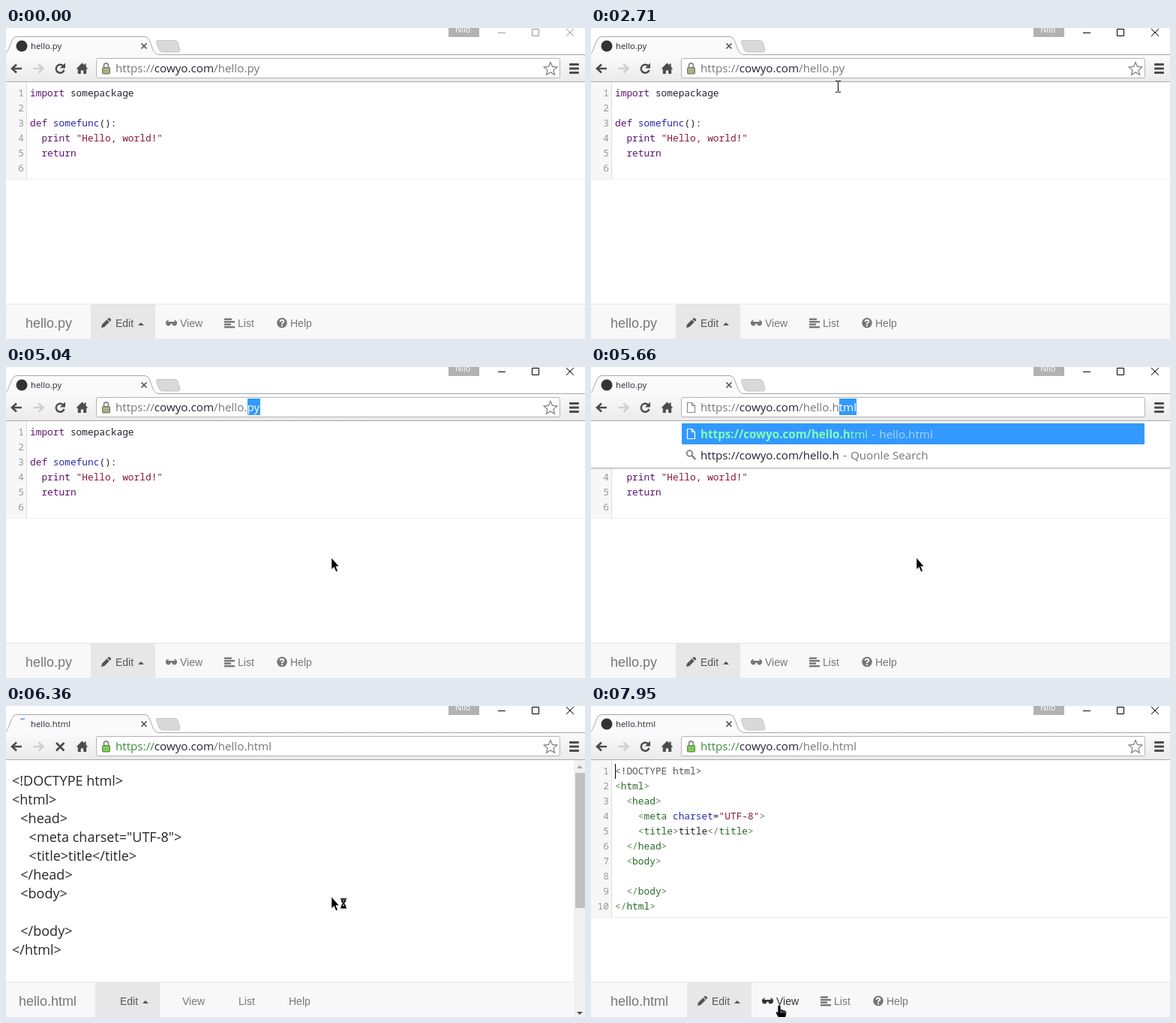
An HTML page for the animation above (8 s loop, 772 by 414 pixels).

```html
<!DOCTYPE html>
<html lang="en">
<head>
<meta charset="utf-8">
<title>Editor in a browser</title>
<style>
  html, body { margin: 0; width: 100%; height: 100%; overflow: hidden; background: #fff; }
  svg { display: block; width: 100%; height: 100%; }
  text { white-space: pre; }
  .ui { font-family: "Open Sans", "Noto Sans", sans-serif; }
  .code { font: 12.83px "Noto Sans Mono", monospace; }
  .nav { font-family: "Liberation Sans", Arial, sans-serif; }
</style>
</head>
<body>
<svg id="stage" viewBox="0 0 772 414" xmlns="http://www.w3.org/2000/svg">
  <defs>
    <linearGradient id="bar" x2="0" y2="1">
      <stop stop-color="#fafafa"/><stop offset="1" stop-color="#ebebeb"/>
    </linearGradient>
  </defs>
  <g id="page"></g>
  <g id="chrome"></g>
  <g id="pointer"></g>
</svg>
<script>
const LOOP = 8000;
const T = { focus: 1940, urlClick: 3250, dragY: 3730, dragP: 4570, type: 5660,
            busy: 5980, go: 6210, raw: 6360, editor: 6440, ready: 6530 };

// Pointer moves: first step, last step, number of steps, path of hot spots
const MOVES = [
  [220, 1000, 11, [[639, 338], [420, 240], [230, 165], [152, 142], [160, 160], [173, 178]]],
  [1080, 1080, 1, [[173, 180]]],
  [1400, 1400, 1, [[170, 178]]],
  [1630, 1630, 1, [[168, 178]]],
  [2180, 2870, 10, [[175, 162], [373, 54]]],
  [3030, 3250, 4, [[380, 55], [398, 60]]],
  [3410, 3410, 1, [[398, 62]]],
  [3560, 3730, 3, [[375, 62], [333, 62]]],
  [4030, 4030, 1, [[331, 62]]],
  [4570, 4570, 1, [[326, 62]]],
  [4890, 5040, 3, [[345, 96], [434, 254]]],
  [6760, 7470, 10, [[428, 251], [340, 228], [258, 234]]],
  [7570, 7950, 6, [[256, 258], [251, 399]]]
];

const within = (t, a, b) => t >= a && t < b;
const esc = s => s.replace(/&/g, '&amp;').replace(/</g, '&lt;');
const rect = (x, y, w, h, fill, more = '') =>
  `<rect x="${x}" y="${y}" width="${w}" height="${h}" fill="${fill}" ${more}/>`;
const fillPath = (d, fill, more = '') => `<path d="${d}" fill="${fill}" ${more}/>`;
const line = (d, color, w = 1, more = '') =>
  `<path d="${d}" fill="none" stroke="${color}" stroke-width="${w}" ${more}/>`;
const label = (cls, x, y, size, color, s) =>
  `<text class="${cls}" x="${x}" y="${y}" font-size="${size}" fill="${color}">${s}</text>`;
const span = (s, color, more = '') => `<tspan fill="${color}" ${more}>${esc(s)}</tspan>`;
const at = (x, y, s) => `<g transform="translate(${x} ${y})">${s}</g>`;

// ---- Editor ----
const INK = { k: '#5c1470', v: '#26202c', d: '#2a2ab0', s: '#8a1838',
              m: '#555', b: '#5f8050', t: '#276b27', a: '#2a2ab0' };
const tag = name => ['b:<', 't:' + name, 'b:>'];
const end = name => ['b:</', 't:' + name, 'b:>'];
const PY = [
  ['k:import', 'v: somepackage'],
  [],
  ['k:def', 'd: somefunc', 'v:():'],
  ['k:  print ', 's:"Hello, world!"'],
  ['k:  return'],
  []
];
const HTML = [
  ['m:<!DOCTYPE html>'],
  tag('html'),
  ['v:  ', ...tag('head')],
  ['b:    <', 't:meta', 'a: charset', 'v:=', 's:"UTF-8"', 'b:>'],
  ['v:    ', ...tag('title'), 'v:title', ...end('title')],
  ['v:  ', ...end('head')],
  ['v:  ', ...tag('body')],
  [],
  ['v:  ', ...end('body')],
  end('html')
];

function editor(lines) {
  const h = lines.length * 20 + 9;
  const rows = lines.map((parts, i) => {
    const y = 91 + i * 20;
    const code = parts.map(p => span(p.slice(2), INK[p[0]])).join('');
    return `<text class="code" x="24" y="${y}" fill="#999" text-anchor="end">${i + 1}</text>` +
           `<text class="code" x="32" y="${y}">${code}</text>`;
  });
  return rect(0, 72, 27, h, '#f7f7f7') + rect(27, 72, 1, h, '#ddd') +
         rect(0, 72 + h, 772, 1, '#eee') + rows.join('');
}

function rawPage() {
  const rows = HTML.map((parts, i) => {
    const s = parts.map(p => p.slice(2)).join('');
    const indent = s.length - s.trimStart().length;
    return label('ui', 8 + indent * 5.65, 106 + i * 25, 18, '#262626', esc(s.trim()));
  });
  return rows.join('') + rect(757, 72, 15, 342, '#f1f1f1') + rect(759, 89, 13, 180, '#c1c1c1') +
         fillPath('M761 83h8l-4-4z', '#a3a3a3') + fillPath('M761 407h8l-4 4z', '#505050');
}

// ---- Bottom bar ----
const ICONS = [
  c => fillPath('M0 13l1-4.2 6.5-6.5 3.2 3.2L4.2 12zM8.3 1.5l1.2-1.2q1-.8 2 0l1.4 1.4q.7 1-.1 1.8l-1.3 1.2z', c),
  c => fillPath('M0 5L3 2.5 4 3.2 2.5 5h10L11 3.2l1-.7L15 5v2.5q-.8 3-3.5 3T8.3 7.5H6.7q-.5 3-3.2 3T0 7.5z', c),
  c => [[1, 10], [4.5, 14], [8, 9], [11.5, 14]].map(([y, w]) => rect(0, y - .5, w, 2.4, c)).join(''),
  c => `<circle cx="7" cy="6.5" r="6.8" fill="${c}"/>` +
       line('M4.7 5q0-2.2 2.3-2.2T9.3 4.7Q9.3 6 7 7v1.2', '#f8f8f8', 1.9) +
       rect(6, 9.2, 2, 2, '#f8f8f8')
];

function navBar(mode, hover) {
  const raw = mode === 'raw', shift = mode === 'html' ? 15 : 0;
  const boxX = raw ? 119 : 113 + shift;
  const xs = raw ? [152, 235, 310, 377] : [146, 232, 309, 379].map(x => x + shift);
  const items = ['Edit', 'View', 'List', 'Help'].map((name, i) => {
    const color = i === 0 ? '#555' : i === 1 && hover ? '#333' : '#777';
    const icon = raw ? '' : at(xs[i] - (i < 2 ? 19 : 18), 386, ICONS[i](color));
    return icon + label('nav', xs[i], 398, 14, color, name);
  });
  const width = raw ? 757 : 772;
  return rect(0, 367, width, 47, '#f8f8f8') + rect(0, 367, width, 1, '#e7e7e7') +
         rect(boxX, 368, 86, 46, '#e7e7e7') +
         label('nav', raw ? 17 : 26, 399, 18, '#777', mode === 'py' ? 'hello.py' : 'hello.html') +
         items.join('') + fillPath(`M${xs[0] + 30} 396h8l-4-4z`, '#555');
}

// ---- Browser frame ----
const GREY = '#79747c', DARK = '#262230', BLUE = '#39f', TOOL = '#4c4c4c';

const sheet = (x, y, color) =>
  at(x, y, line('M.5 .5h6l4 4v9h-10zM6.5 .5v4h4', color, 1.2));

const lock = (body, edge) =>
  line('M130.5 53v-3q0-3 3-3t3 3v3', '#8a8a8a', 1.8) +
  rect(128.5, 52.5, 10, 8.5, body, `stroke="${edge}" rx="1"`) +
  line('M130 55.5h7M130 58.5h7', '#fff', .8, 'opacity=".45"');

function tools(loading) {
  const arrow = 'M7.5 0L1.5 5.5 7.5 11M2 5.5H14.5';
  const reload = loading
    ? line('M67 49l10.5 10.5M77.5 49L67 59.5', TOOL, 2.8)
    : line('M76 50.2A5.5 5.5 0 1 0 77.5 56', TOOL, 2.4) + fillPath('M79 46.5v7h-7z', TOOL);
  return line(arrow, TOOL, 2.6, 'transform="translate(6.5 48.5)"') +
         line(arrow, '#cfcfcf', 2.6, 'transform="translate(51 48.5) scale(-1 1)"') + reload +
         fillPath('M93.5 54.5L101.5 46.5l3 3v-2h2.2v4.2l2.8 2.8h-2.3V61h-4v-4.5h-3.4V61h-4v-6.5z', TOOL) +
         [47, 52.5, 58].map(y => rect(751, y, 13, 3, TOOL, 'rx="1"')).join('');
}

const STAR = 'M726 45.5l2.5 5.9 6.3.5-4.8 4.2 1.5 6.2-5.5-3.3-5.5 3.3 1.5-6.2-4.8-4.2 6.3-.5z';
const TAB = 'M-5 35.5C1 35.5 1 33 3 28.5L8 16.5Q10 11.5 14 11.5H185Q189 11.5 191 16L196 29Q199 35.5 204 35.5';
const NEW_TAB = 'M202 16.5H225Q228 16.5 229 19L232 29Q232.5 32 229 32H209Q205.5 32 204 29L200.5 19Q200 16.5 202 16.5z';

function windowFrame(t) {
  const ink = t < T.focus ? '#999' : '#000';
  const loading = within(t, T.go, T.ready);
  const mark = loading
    ? line('M19.500 18Q22 16.5 25 17.5', '#5a9be0', 1.5,
           `transform="rotate(${Math.floor((t - T.raw) / 80) * 40} 22 24)"`)
    : '<circle cx="21" cy="24" r="7.5" fill="#333"/>';
  return rect(0, 0, 772, 36, '#fff') + rect(590, 0, 41, 12, '#b2b2b2') +
    label('ui', 599, 6, 11, '#fff', 'Nilo') +
    line('M656 6.5h10M701.5 1.5h9v9h-9zM747 1l10 10M757 1L747 11', ink) +
    fillPath(NEW_TAB, '#d9d9d9', 'stroke="#c6c6c6"') +
    rect(0, 36, 772, 35, 'url(#bar)') + fillPath(TAB + 'z', '#fafafa') +
    line(TAB + 'H772', '#a9a9a9') + rect(0, 71, 772, 1, '#a9a9a9') + mark +
    label('ui', 33, 28, 11.3, '#2d2633', t < T.raw ? 'hello.py' : 'hello.html') +
    line('M180.5 20.5l7 7M187.5 20.5l-7 7', '#555', 1.7) + tools(loading) +
    rect(120.5, 40.5, 618, 26, '#fff', 'stroke="#b4b4b4" rx="2"') +
    (within(t, T.type, T.go) ? '' : line(STAR, '#7c7c7c', 1.2));
}

const typedCount = t => t < 5820 ? 1 : t < 5900 ? 2 : t < T.busy ? 3 : 4;

function addressText(t) {
  let path = '/hello.py', picked = 0, from = 339;
  if (t >= T.type) {
    const typed = typedCount(t);
    path = '/hello.html';
    picked = 4 - typed;
    from = [0, 331, 336, 350, 354][typed];
  } else if (t >= T.dragY) {
    picked = t < T.dragP ? 1 : 2;
    from = picked === 1 ? 331 : 322;
  }
  const right = t < T.type ? 339 : 354, cut = path.length - picked;
  const icon = within(t, T.type, T.raw) ? sheet(128, 47, '#8a8a8a')
    : t < T.type ? lock('#a3a37c', '#74745c') : lock('#77bd4f', '#4d9530');
  return icon + (picked ? rect(from, 42, right - from, 22, BLUE) : '') +
    label('ui', 146, 59, 15.2, GREY,
      span('https://', t < T.raw ? GREY : '#3d8b3d') + span('cowyo.com', DARK) +
      span(path.slice(0, cut), GREY) + span(path.slice(cut), '#fff')) +
    (within(t, T.urlClick, 3560) ? rect(339, 44, 1, 19, '#000') : '');
}

function suggestions(t) {
  const n = typedCount(t);
  const base = 'https://cowyo.com/hello.', typed = 'html'.slice(0, n);
  const dash = (name, color) => span(' -', color, 'dx="1.2"') + span(' ' + name, color, 'dx="1.2"');
  return rect(0, 72, 772, 62, '#fff') + rect(0, 134, 772, 1, '#b0b0b0') +
    rect(0, 135, 772, 2, '#000', 'opacity=".05"') +
    rect(121, 75, 617, 28, BLUE) + sheet(128, 82, '#fff') +
    label('ui', 146, 95, 15.2, '#fff',
      span(base + typed, '#84ffb4', 'font-weight="700"') + span('html'.slice(n), '#84ffb4') +
      dash('hello.html', '#a9d5ff')) +
    '<circle cx="131.5" cy="115" r="3.8" fill="none" stroke="#808080" stroke-width="1.8"/>' +
    line('M134.5 118l5 5', GREY, 2.2) +
    label('ui', 146, 123, 15.2, DARK, span(base + typed, DARK) + dash('Quonle Search', GREY));
}

// ---- Pointer ----
function pointerAt(t) {
  const slack = 8;
  const move = MOVES.filter(m => t + slack >= m[0]).pop();
  if (!move) return null;
  const [t0, t1, n, pts] = move;
  if (n === 1) return pts[0];
  const step = Math.min(n - 1, Math.floor((t + slack - t0) / ((t1 - t0) / (n - 1))));
  const u = step / (n - 1) * (pts.length - 1);
  const i = Math.min(pts.length - 2, Math.floor(u)), f = u - i;
  return pts[i].map((v, k) => v + (pts[i + 1][k] - v) * f);
}

const HAND =
  fillPath('M-2 0Q0-2 2 0V5Q5 4 5 6 8 5 8 7 10.5 7 9.5 11L8 18H0L-4.5 10Q-5.5 7-2 8.5z', '#000', 'stroke="#fff" stroke-width=".7"') +
  line('M2.5 6v4M5 7v3M7.5 8v2', '#fff', .6);
const BEAM = line('M-3-7.5H0M1-7.5H4M-3 7.5H0M1 7.5H4M.5-7V7', '#000');
const ARROW = fillPath('M0 0V15.5L3.3 12.3 6 18.5 8.3 17.5 5.8 11.5H10z', '#000', 'stroke="#fff" stroke-width=".5"');
const GLASS = rect(12, 2, 8, 1.5, '#000') + rect(12, 14, 8, 1.5, '#000') +
  fillPath('M13 4h6v2l-2 2.8 2 2.8v2.4h-6v-2.4l2-2.8-2-2.8z', '#000') +
  fillPath('M14.5 5h3l-1.5 1.5zM14.5 12l1.5-2 1.5 2z', '#fff');

function pointer(t, p) {
  if (!p) return '';
  const [x, y] = p.map(Math.round);
  const busy = within(t, T.busy, T.ready);
  const editorEnd = t < T.editor ? 201 : 281;
  const shape = y > 367 ? HAND : busy ? ARROW + GLASS : y < editorEnd ? BEAM : ARROW;
  return at(x, y, shape);
}

// ---- Scene ----
const caret = (x, y) => rect(x, y, 1, 20, '#000');

function page(t, p) {
  const mode = t < T.raw ? 'py' : t < T.editor ? 'raw' : 'html';
  const body = mode === 'raw' ? rawPage() : editor(mode === 'py' ? PY : HTML);
  let mark = '';
  if (within(t, T.focus, 2470) || within(t, 3030, T.urlClick)) mark = caret(94, 157);
  if (within(t, T.ready, 7040) || t >= 7570) mark = caret(32, 77);
  return body + mark + navBar(mode, p && p[1] > 367);
}

const shown = {};
function put(id, markup) {
  if (shown[id] === markup) return;
  shown[id] = markup;
  document.getElementById(id).innerHTML = markup;
}

function draw(t) {
  const p = pointerAt(t);
  put('page', page(t, p));
  put('chrome', windowFrame(t) + addressText(t) + (within(t, T.type, T.go) ? suggestions(t) : ''));
  put('pointer', pointer(t, p));
}

function tick(now) {
  draw(now % LOOP);
  requestAnimationFrame(tick);
}
draw(0);
requestAnimationFrame(tick);
</script>
</body>
</html>
```
